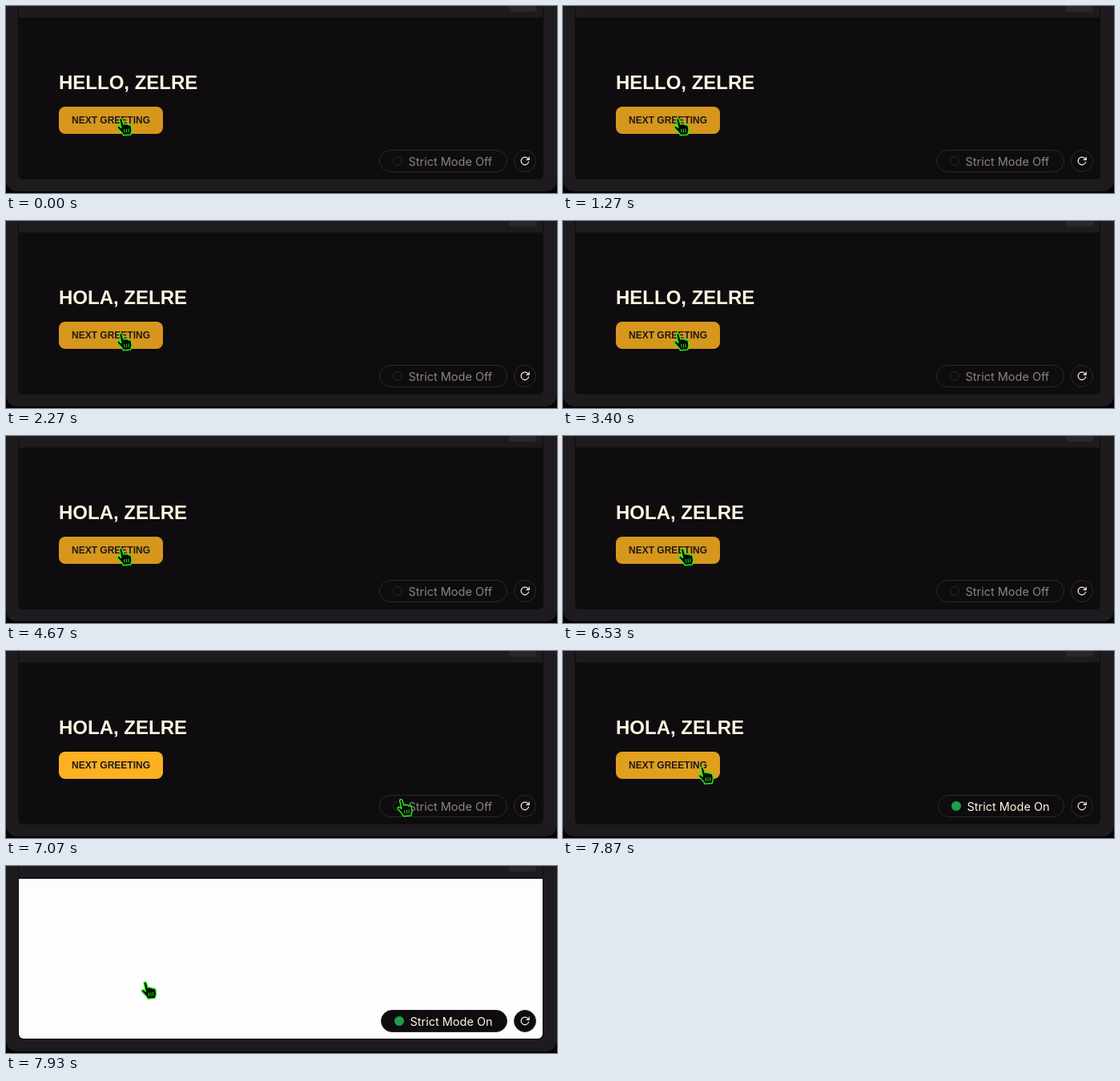
An HTML page for the animation above (8000 ms loop, 688 px wide and 234 px high).

```html
<!DOCTYPE html>
<html lang="en">
<head>
<meta charset="utf-8">
<title>Greeting</title>
<style>
html, body { margin: 0; width: 100%; height: 100%; overflow: hidden; background: #050405; }
svg { display: block; width: 688px; height: 234px; }
.bold { font-family: "Liberation Sans", Arial, sans-serif; font-weight: 700; }
.mode { font: 400 14.5px Inter, Roboto, sans-serif; }
.chip { fill: #0e0c0f; stroke: #2b292c; }
.icon { fill: none; stroke: #fbf3e0; stroke-width: 1.2; stroke-linecap: round; stroke-linejoin: round; }
</style>
</head>
<body>
<svg viewBox="0 0 688 234">
  <rect y="-30" width="688" height="262" rx="14" fill="#1d1b1d"/>
  <rect x="628" y="-10" width="34" height="17" rx="3" fill="#2a282a"/>
  <path d="M15.5 0V16M670.5 0V16" stroke="#0e0c0f"/>
  <path d="M15 14.5H671V211a6 6 0 0 1-6 6H21a6 6 0 0 1-6-6Z" fill="#0e0c0f"/>

  <g id="page">
    <text id="hello" class="bold" x="66" y="104" font-size="24" fill="#fff6df"></text>
    <rect id="button" x="66" y="126" width="130" height="34" rx="8"/>
    <text class="bold" x="82" y="147" font-size="12" fill="#1f1b1a">NEXT GREETING</text>
  </g>
  <path id="blank" d="M16 16H670V210a6 6 0 0 1-6 6H22a6 6 0 0 1-6-6Z" fill="#fdfdfd"/>

  <g id="off">
    <rect class="chip" x="466.5" y="180.5" width="159" height="27" rx="13.5"/>
    <circle cx="489" cy="194" r="5.5" fill="none" stroke="#2b292c"/>
    <text class="mode" x="502.5" y="199.6" fill="#8a857d">Strict Mode Off</text>
  </g>
  <g id="on">
    <rect class="chip" x="468.5" y="180.5" width="157" height="27" rx="13.5"/>
    <circle cx="491" cy="194" r="6" fill="#1f9f4b"/>
    <text class="mode" x="504.5" y="199.6" fill="#fff6df">Strict Mode On</text>
  </g>
  <circle class="chip" cx="648" cy="194" r="13.5"/>
  <path class="icon" d="M652.6 195.2A4.8 4.8 0 1 1 651.4 190.6L653 192.2M653.2 189.2V192.4H650"/>

  <g id="hand">
    <path d="M4.6 2.8C5.2 1.2 7.4 1.2 8 3L9.8 9C10.5 7.8 12.5 8 13 9.3C14 8.4 15.6 8.8 16 10C17.5 9.3 19 10 19.3 11.5L20 16C20.2 18 19 19.5 18.8 22L9.5 22.8C8.5 20 5.5 17.5 2.5 14C1 12 3 10.5 5 11.8L6.8 13.4Z"
      fill="#000" stroke="#2bec1b" stroke-width="1.5" stroke-linejoin="round"/>
    <path d="M10.6 15L11.2 19.6M13.3 14.7L13.8 19.4M16 14.4L16.3 19.2" stroke="#2bec1b"/>
  </g>
</svg>
<script>
const LOOP = 8000;
const NAME = "ZELRE";
const greetings = [
  [0, "HELLO"], [1330, "HOLA"], [2730, "BONJOUR"], [3270, "HELLO"],
  [4130, "HOLA"], [4800, "BONJOUR"], [5270, "HELLO"], [6130, "HOLA"]
];
const TOGGLE = 7240, RELOAD = 7930;
const IDLE = [252, 176, 34], HOVER = [214, 151, 28];

const el = id => document.getElementById(id);
const [hello, button, page, blank, off, on, hand] =
  ["hello", "button", "page", "blank", "off", "on", "hand"].map(el);

const ramp = (t, a, b) => Math.min(1, Math.max(0, (t - a) / (b - a)));
const cubic = p => p < .5 ? 4 * p ** 3 : 1 - 4 * (1 - p) ** 3;
const sine = p => (1 - Math.cos(Math.PI * p)) / 2;
const mix = (a, b, p) => a + (b - a) * p;
const show = (node, yes) => node.setAttribute("visibility", yes ? "visible" : "hidden");

function handAt(t) {
  const go = cubic(ramp(t, 6440, 7010));
  const back = cubic(ramp(t, 7370, 7860));
  return [137 + mix(350 * go, 30.5, back), 139 + mix(45 * go ** 1.9, 4.5, back)];
}

function draw(t) {
  const word = greetings.filter(g => g[0] <= t).pop()[1];
  const line = word + ", " + NAME;
  if (hello.textContent !== line) hello.textContent = line;

  const hover = 1 - sine(ramp(t, 6610, 6810)) + sine(ramp(t, 7745, 7945));
  const rgb = IDLE.map((c, i) => Math.round(mix(c, HOVER[i], hover)));
  button.setAttribute("fill", `rgb(${rgb})`);

  show(off, t < TOGGLE);
  show(on, t >= TOGGLE);
  show(page, t < RELOAD);
  show(blank, t >= RELOAD);
  hand.setAttribute("transform", `translate(${handAt(t)})`);
}

const start = performance.now();
function tick() {
  draw((performance.now() - start) % LOOP);
  requestAnimationFrame(tick);
}
tick();
</script>
</body>
</html>
```
